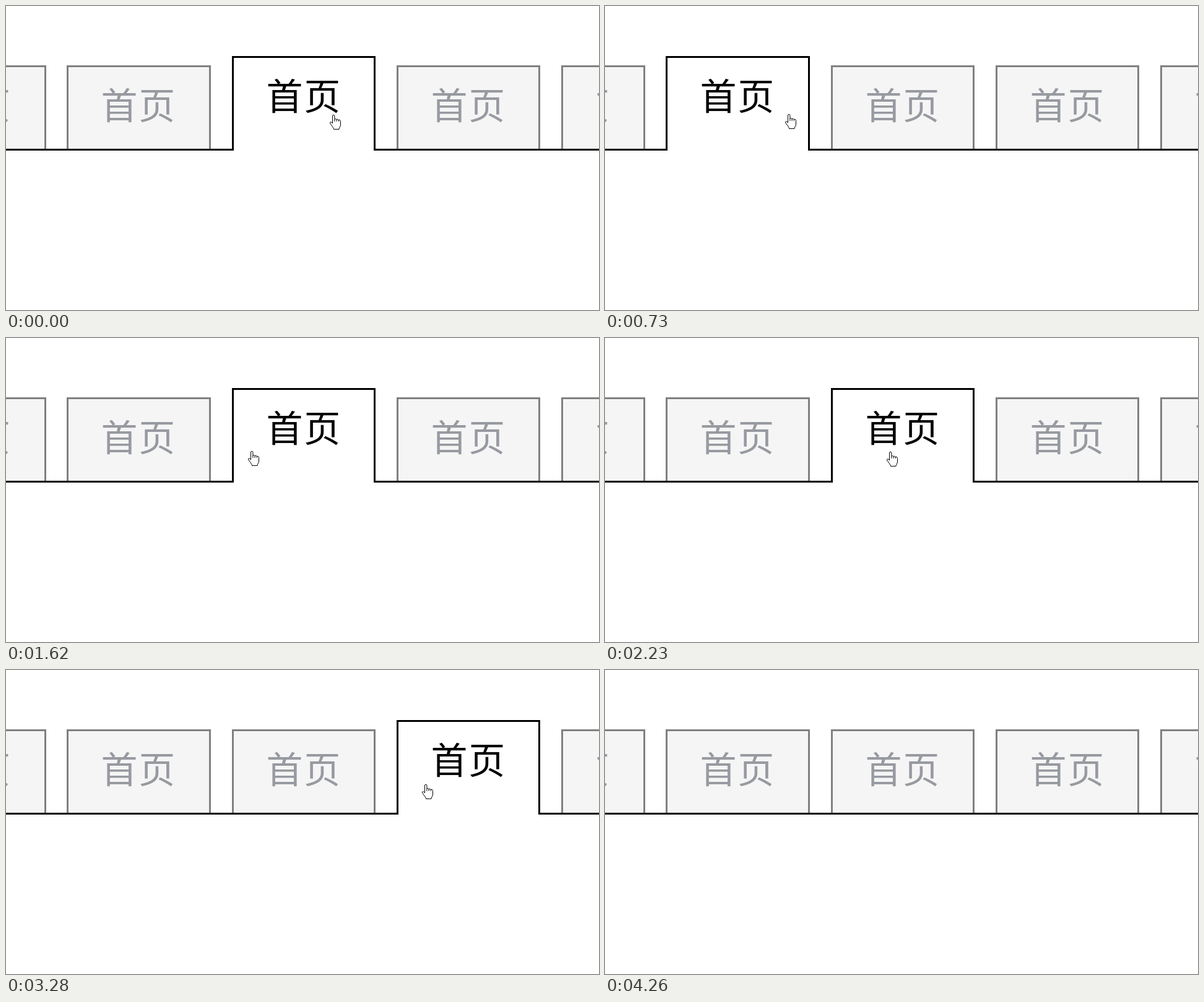
An HTML page for the animation above (5110 ms loop, 958 px wide and 492 px high).

```html
<!DOCTYPE html>
<html lang="zh-CN">
<head>
<meta charset="utf-8">
<title>Tabs</title>
<style>
  html, body { margin: 0; width: 100%; height: 100%; overflow: hidden; background: #fff; }
  svg { display: block; }
  text { font: 59px "Noto Sans CJK SC", "Noto Sans CJK", sans-serif; letter-spacing: 1.8px; fill: #979aa0; }
  .tab path { fill: #f5f5f5; stroke: #808080; stroke-width: 3; }
  .tab.on path { fill: #fff; stroke: #000; }
  .tab.on text { fill: #000; }
  #cursor path { fill: #fff; stroke: #000; stroke-linejoin: round; }
</style>
</head>
<body>
<svg width="958" height="492" viewBox="0 0 958 492">
  <rect y="231" width="958" height="3"/>
  <g id="tabs"></g>
  <g id="cursor">
    <path id="hand" d="M-1.5 14V2a1.7 1.7 0 0 1 3.4 0V7q1.6-1.2 3.2.6q1.7-1 3.2.8q3-.6 3.2 2V16Q11.5 18 10 20.5Q9 22 9 23.5H.5Q.5 22-1 20L-5.3 14q-.8-2.2 1-2.3q1.4 0 2.8 2.3M1.9 7V11M5.1 7.6V11M8.3 8.4V11"/>
    <path id="arrow" d="M.5.5V16.5L4 13.2L6.6 19.3L9 18.3L6.5 12.3H11.5Z"/>
  </g>
</svg>
<script>
const LOOP = 5110, LAG = 40;
const $ = id => document.getElementById(id);
const smooth = p => p * p * (3 - 2 * p);

// Pointer moves: start, end, steps, destination, easing
const START = [529, 176];
const moves = [
  [160, 200, 2, [527, 175], smooth],
  [410, 730, 9, [297, 175], smooth],
  [1380, 1660, 8, [403, 183], p => smooth(p ** 1.13)],
  [2230, 2550, 9, [705, 186], p => smooth(p ** 0.58)],
  [3280, 3410, 4, [533, 178], smooth],
  [4010, 4260, 7, [1006, 580], p => p * p]
];

const tabs = [-1, 0, 1, 2, 3].map(i => {
  const left = 98.4 + 266.3 * i;
  const x = Math.round(left), r = Math.round(left + 232.45);
  const el = document.createElementNS("http://www.w3.org/2000/svg", "g");
  el.innerHTML = `<path/><text x="${x + 55.5}">首页</text>`;
  $("tabs").append(el);
  return { x, r, el };
});

function pointer(t) {
  let pos = START;
  for (const [start, end, n, to, ease] of moves) {
    if (t < start) break;
    const k = Math.floor((t - start) * (n - 1) / (end - start) + 1e-6);
    const e = ease(Math.min(1, (k + 1) / n));
    pos = pos.map((v, i) => v + (to[i] - v) * e);
  }
  return pos;
}

const hit = ([x, y]) => y < 232 ? tabs.find(tab => x >= tab.x && x < tab.r) : undefined;

function draw(t) {
  const pos = pointer(t), over = hit(pos);
  const active = hit(pointer(Math.max(0, t - LAG)));
  for (const tab of tabs) {
    const on = tab === active, top = on ? 82.5 : 97.5, bottom = on ? 234 : 231;
    const [path, label] = tab.el.children;
    tab.el.setAttribute("class", on ? "tab on" : "tab");
    path.setAttribute("d", `M${tab.x + 1.5} ${bottom}V${top}H${tab.r - 1.5}V${bottom}`);
    label.setAttribute("y", top + 85.5);
  }
  $("cursor").setAttribute("transform", `translate(${pos.map(Math.round)})`);
  $("hand").style.display = over ? "" : "none";
  $("arrow").style.display = over ? "none" : "";
}

let origin;
function tick(now) {
  origin ??= now;
  draw((now - origin) % LOOP);
  requestAnimationFrame(tick);
}
draw(0);
requestAnimationFrame(tick);
</script>
</body>
</html>
```
